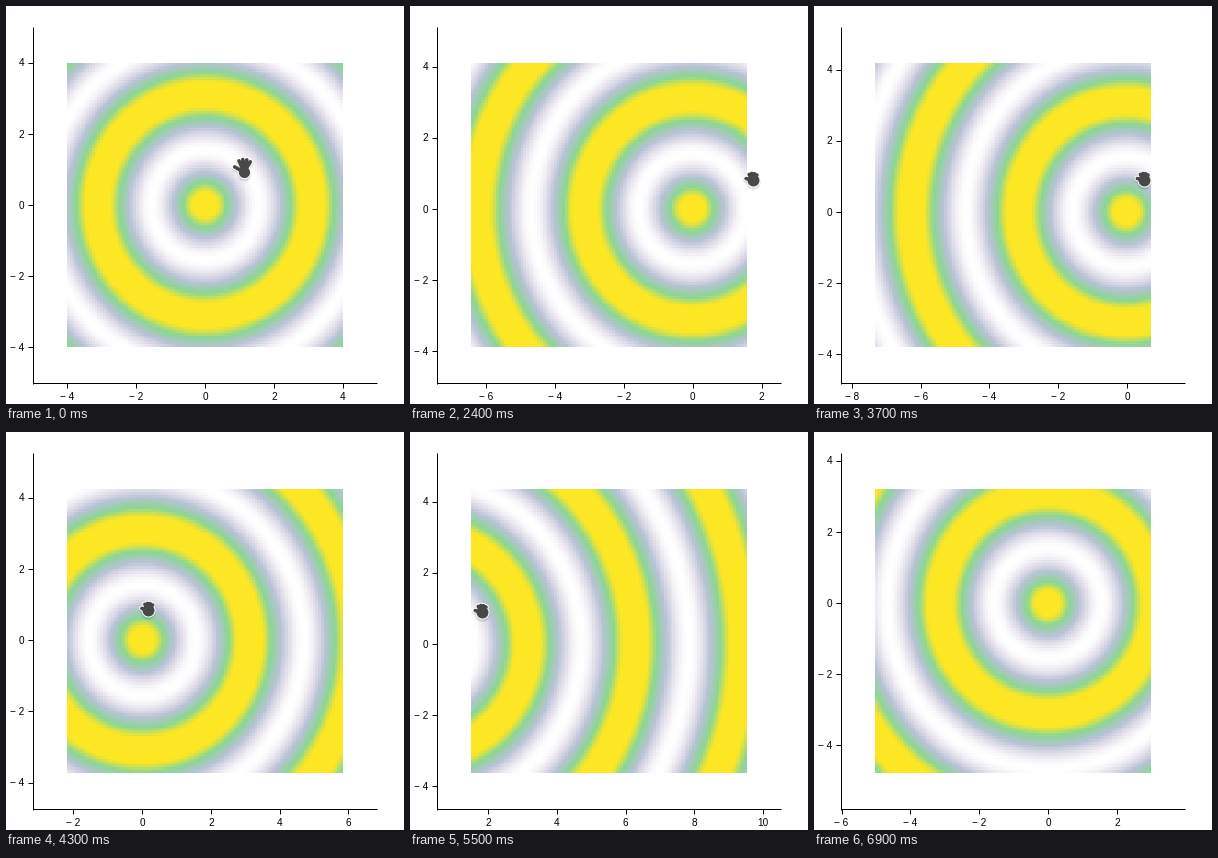
Animation of 398x398 px, one loop 7900 ms. Source, as a matplotlib script:

```python
import matplotlib.pyplot as plt
import numpy as np
from matplotlib.animation import FuncAnimation
from matplotlib.colors import LinearSegmentedColormap
from matplotlib.transforms import Affine2D

SIZE, DPI = 398, 100
PX = 72 / DPI                       # one pixel in points
LEFT, RIGHT, TOP, BOTTOM = 27, 371, 21, 377
UNIT = np.array([34.4, 35.6])       # pixels per data unit
STEPS, STEP_MS = 79, 100
CLOSE, RELEASE, GONE = 5, 65, 69    # steps at which the hand changes
GRAB = np.array([38, -33])          # closed hand relative to the data origin


def ease(step, start, end):
    t = np.clip((step - start) / (end - start), 0, 1)
    return t * t * (3 - 2 * t)


def origin(step):
    """Screen position of the data origin while the plot is dragged about."""
    x = (199 + 11 * ease(step, 6, 11) + 135 * ease(step, 19, 28.5)
         - 371 * ease(step, 34, 50.6) + 260 * ease(step, 52, 65))
    y = (199 - 26 * ease(step, 6, 11) - 37 * ease(step, 15, 16.8)
         + 70 * ease(step, 17, 25) + 6 * ease(step, 41, 46)
         - 41 * ease(step, 57, 65))
    return np.array([x, y])


def hand_position(step):
    if step < CLOSE:
        return np.array([237, 161 if step < 3 else 163.5])
    if step >= RELEASE:
        leave = ease(step, RELEASE, GONE - 1)
        return origin(step) + GRAB - leave * np.array([81, 134])
    moving = not np.allclose(origin(step), origin(step - 1))
    return origin(step + moving) + GRAB     # the plot trails by one step


fig = plt.figure(figsize=(SIZE / DPI, SIZE / DPI), dpi=DPI, facecolor="white")
ax = fig.add_axes([0, 0, 1, 1])
ax.axis("off")

ramp = LinearSegmentedColormap.from_list("waves", [
    (0, "white"), (.12, "#eae5ef"), (.36, "#b8c2d6"),
    (.66, "#8cd794"), (.88, "#fde725"), (1, "#fde725")])
grid = np.linspace(-4, 4, 100)


def waves(center):
    mid = (199 - center) / UNIT
    r = np.hypot(grid[None, :] + mid[0], grid[:, None] + mid[1])
    return np.cos(r) ** 2


image = ax.imshow(waves(origin(0)), cmap=ramp, vmin=0, vmax=1,
                  extent=(61, 337, 341, 57), interpolation="nearest",
                  aspect="auto", zorder=1)

line_style = dict(color="black", lw=PX, solid_capstyle="butt", zorder=2)
ax.plot([LEFT, LEFT], [TOP, BOTTOM + 1], **line_style)
ax.plot([LEFT, RIGHT], [BOTTOM, BOTTOM], **line_style)
x_ticks, = ax.plot([], [], **line_style)
y_ticks, = ax.plot([], [], **line_style)


def label_pool(align):
    return [ax.text(0, 0, "", family="Liberation Sans", size=10 * PX,
                    ha=align, va="baseline", zorder=3) for _ in range(6)]


x_labels, y_labels = label_pool("center"), label_pool("right")


def visible_ticks(zero, unit, low, high):
    places = [(v, zero + v * unit) for v in range(-20, 21, 2)]
    return [(v, p) for v, p in places if low <= p <= high]


def broken(pairs):
    """Separate segments joined into one line with gaps."""
    rows = [row for a, b in pairs for row in (a, b, (np.nan, np.nan))]
    return np.array(rows).T


def place_labels(pool, ticks, spot):
    for text in pool:
        text.set_text("")
    for text, (value, pos) in zip(pool, ticks):
        text.set_text(f"\u2212 {-value}" if value < 0 else str(value))
        text.set_position(spot(pos))


hand_move = Affine2D()


def make_hand(reach, knuckle_y, palm_y, palm_radius):
    """Thumb and four fingers fanned out from a round palm."""
    angles = [-1.35, *np.linspace(-.55, .72, 4)]
    fingers = [((1 + reach * np.sin(a), knuckle_y - reach * np.cos(a)),
                (1, palm_y)) for a in angles]
    parts = []
    layers = [("black", 2.4, 1.5, .12), ("white", 2, 0, 1), ("#484848", 0, 0, 1)]
    for depth, (color, extra, drop, alpha) in enumerate(layers):
        place = Affine2D().translate(0, drop) + hand_move + ax.transData
        style = dict(color=color, alpha=alpha, transform=place, zorder=5 + depth)
        parts += ax.plot(*broken(fingers), lw=(3.6 + extra) * PX,
                         solid_capstyle="round", **style)
        parts += ax.plot([1], [palm_y], "o", mew=0,
                         ms=(2 * palm_radius + extra) * PX, **style)
    return parts


open_hand = make_hand(9.6, 2, 5.2, 5.6)
fist = make_hand(6.6, 1, 1.3, 6)
ax.set_xlim(0, SIZE)
ax.set_ylim(SIZE, 0)


def draw(step):
    center = origin(step)
    image.set_data(waves(center))

    xs = visible_ticks(center[0], UNIT[0], LEFT, RIGHT)
    ys = visible_ticks(center[1], -UNIT[1], TOP, BOTTOM)
    x_ticks.set_data(*broken([((p, BOTTOM), (p, BOTTOM + 5)) for _, p in xs]))
    y_ticks.set_data(*broken([((LEFT - 5, p), (LEFT, p)) for _, p in ys]))
    place_labels(x_labels, xs, lambda p: (p, 394))
    place_labels(y_labels, ys, lambda p: (18.3, p + 3.7))

    hand_move.clear().translate(*hand_position(step))
    closed = CLOSE <= step < RELEASE
    for part in open_hand:
        part.set_visible(not closed and step < GONE)
    for part in fist:
        part.set_visible(closed)
    return []


anim = FuncAnimation(fig, draw, frames=STEPS, interval=STEP_MS,
                     init_func=lambda: draw(0), repeat=True, repeat_delay=0)
plt.show()
```
